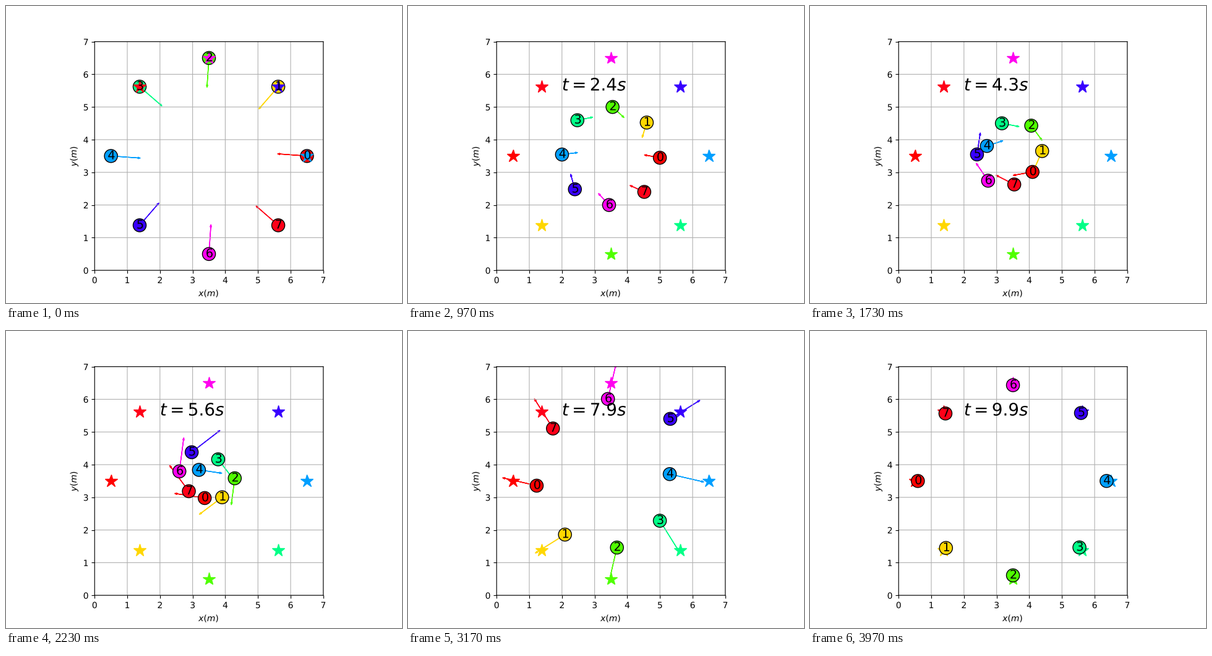
Animation of 640 by 480 pixels, one loop 4.01 s. Source, as a matplotlib script:

```python
import math
import numpy as np
import matplotlib.pyplot as plt
from matplotlib.animation import FuncAnimation
from matplotlib.patches import Circle
from matplotlib.patheffects import Normal

# Smooth sub-pixel lines and text instead of pixel snapping.
plt.rcParams.update({'path.snap': False, 'path.effects': [Normal()]})

N = 8
LOOP, FRAMES, STEPS = 4010, 200, 100
MS = LOOP / FRAMES
REST = 9.6

robots = np.arange(N)
bearing = 45.0 * robots
rank = (robots - 5) % N - 3.5          # order around the swirl, leader first
wave = np.cos(np.radians(72 * (rank + 3.1)))
zigzag = np.where(robots % 2, 1, -1)

# Shared motion: radius, turn (deg), arrow length, arrow heading (deg)
times = np.array([0, 1.3, 2.4, 4.3, 5.6, 7.9, REST])
keys = np.array([
    [3.00, 0, .83, 0],
    [2.05, 0, .61, 0],
    [1.50, -2, .41, 27],
    [0.94, -36, .52, 24],
    [0.70, -90, .83, -8],
    [2.22, -176, 1, -13],
    [2.905, -180, 1, -10],
])
slopes = np.gradient(keys, times, axis=0)


def polar(r, deg):
    return r * np.exp(1j * np.radians(deg))


def bump(t, mid, width):
    return math.exp(-((t - mid) / width) ** 2)


def shared(t):
    """Cubic Hermite curve through the keys."""
    k = min(np.searchsorted(times, t, side='right') - 1, len(times) - 2)
    h = times[k + 1] - times[k]
    u = (t - times[k]) / h
    return ((1 + 2 * u) * (1 - u) ** 2 * keys[k]
            + u * (1 - u) ** 2 * h * slopes[k]
            + u * u * (3 - 2 * u) * keys[k + 1]
            + u * u * (u - 1) * h * slopes[k + 1])


def state(t):
    """Positions and velocities of all robots as complex numbers."""
    moving = t < REST
    t = min(t, REST)
    radius, turn, speed, heading = shared(t)
    r = (radius - .145 * bump(t, 7.2, 1.5) * rank
         + .24 * bump(t, 5, 1.2) * wave)
    angle = (bearing + turn + 8 * bump(t, 5.6, 1.5) * rank
             + 2 * bump(t, 5.6, .9) * (rank ** 2 - 5.25))
    v = moving * (speed - .06 * bump(t, 5.3, 1) * rank)
    course = (bearing + 180 + heading + 38 * bump(t, 3, 1.3) * wave
              + 26 * bump(t, 1.3, .95) * zigzag)
    return 3.5 + 3.5j + polar(r, angle), polar(v, course)


fig, ax = plt.subplots(figsize=(6.4, 4.8), dpi=100)
ax.set_aspect('equal')
ax.set(xlabel='$x(m)$', ylabel='$y(m)$', xticks=range(8), yticks=range(8))
ax.grid(True)

cmap = plt.get_cmap('hsv', N)
goals = 3.5 + 3.5j + polar(3, bearing + 180)
discs, arrows, labels = [], [], []
for i, goal in enumerate(goals):
    c = cmap(i)
    ax.plot(goal.real, goal.imag, '*', color=c, markersize=15)
    discs.append(ax.add_patch(
        Circle((0, 0), 0.2, facecolor=c, edgecolor='k', zorder=2)))
    arrows.append(ax.arrow(0, 0, 1, 0, head_width=0.05, color=c, zorder=1))
    labels.append(ax.text(0, 0, str(i), fontsize=14))
clock = ax.text(2, 5.5, '', fontsize=20)
ax.set(xlim=(0, 7), ylim=(0, 7))


def step_at(ms):
    """Simulation step (25 per second) shown on a 30 Hz display."""
    tick = math.floor((ms + 3.4) * 0.03)
    return min(STEPS - 1, math.ceil(tick * 5 / 6 - 0.5))


def update(frame):
    n = step_at(frame * MS + 15)
    for p, v, disc, arrow, label in zip(*state(n / 10), discs, arrows, labels):
        disc.center = p.real, p.imag
        arrow.set_data(x=p.real, y=p.imag, dx=v.real, dy=v.imag)
        label.set_position((p.real - 0.1, p.imag - 0.1))
    clock.set_text(f'$t={n / 10:.1f}s$' if n else '')
    return [*discs, *arrows, *labels, clock]


anim = FuncAnimation(fig, update, frames=FRAMES, interval=MS,
                     repeat=True, repeat_delay=0, blit=False)
plt.show()
```
